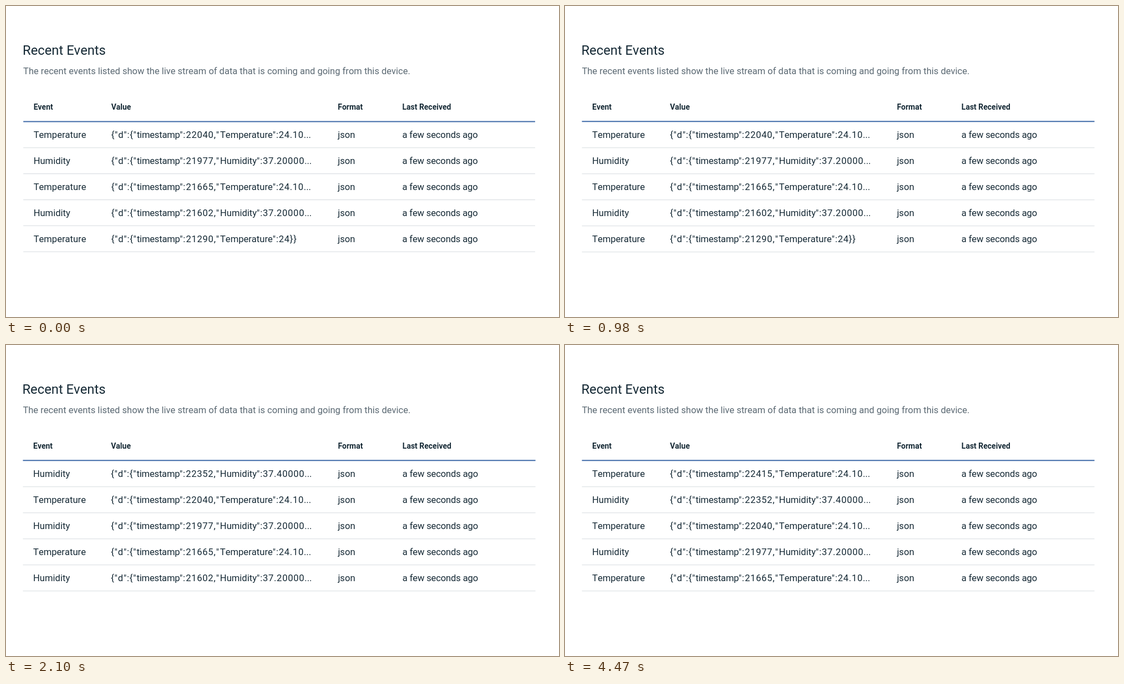
These frames come from a looping animation (997x561 px, 5670 ms). An HTML page:

```html
<!DOCTYPE html>
<html lang="en">
<head>
<meta charset="utf-8">
<title>Recent Events</title>
<style>
  html, body { margin: 0; width: 100%; height: 100%; overflow: hidden; background: #fff; }
  svg { display: block; width: 100vw; height: 100vh; }
  text { font: 16.6px Roboto, "Noto Sans", sans-serif; font-kerning: none; fill: #152935; }
  .title { font-size: 23.8px; }
  .intro { font-size: 16.54px; fill: #5a6872; }
  .head { font-size: 14px; font-weight: 700; }
  .ago { letter-spacing: -.15px; }
  .word { letter-spacing: -.2px; }
  .mark { letter-spacing: .8px; }
  .digits { letter-spacing: .7px; }
</style>
</head>
<body>
<svg viewBox="0 0 997 561"><g id="panel"></g></svg>
<script>
const LOOP = 5670;
const SETTLE = 980;
const ARRIVALS = [2100, 2660];
const ROWS = 5, PITCH = 47;
const LEFT = 30.5, RIGHT = 954.6;
const COLUMNS = { Event: 49, Value: 189.2, Format: 598.4, "Last Received": 714.8 };

// Oldest first: timestamp, sensor, visible end of the payload
const events = [
  [21290, "Temperature", "24", "}}"],
  [21602, "Humidity", "37.20000", "..."],
  [21665, "Temperature", "24.10", "..."],
  [21977, "Humidity", "37.20000", "..."],
  [22040, "Temperature", "24.10", "..."],
  [22352, "Humidity", "37.40000", "..."],
  [22415, "Temperature", "24.10", "..."]
];

const panel = document.getElementById("panel");

function add(parent, tag, attrs, content = "") {
  const node = document.createElementNS("http://www.w3.org/2000/svg", tag);
  for (const key in attrs) node.setAttribute(key, attrs[key]);
  node.textContent = content;
  return parent.appendChild(node);
}

const label = (x, y, content, cls = "") => add(panel, "text", { x, y, class: cls }, content);
const rule = (y, color, width) => add(panel, "line",
  { x1: LEFT, x2: RIGHT, y1: y, y2: y, stroke: color, "stroke-width": width });

label(29.4, 88.2, "Recent Events", "title");
label(30.4, 123, "The recent events listed show the live stream of data that is coming and going from this device.", "intro");
for (const name in COLUMNS) label(COLUMNS[name], 186.8, name, "head");
rule(208.3, "#406ba8", 2);

const rows = Array.from({ length: ROWS }, (_, i) => {
  const y = 238 + i * PITCH;
  rule(255.6 + i * PITCH, "#dfe3e6", 1.4);
  label(COLUMNS.Format, y, "json");
  label(COLUMNS["Last Received"], y, "a few seconds ago", "ago");
  return { name: label(COLUMNS.Event, y, ""), value: label(COLUMNS.Value, y, "") };
});

function writeValue(node, [stamp, sensor, reading, tail]) {
  node.textContent = "";
  const part = (cls, content, x) => add(node, "tspan", x ? { class: cls, x } : { class: cls }, content);
  part("mark", '{"d":{"');
  part("word", "timestamp", 235.5);
  part("mark", '":', 313);
  part("digits", stamp, 324.2);
  part("mark", ',"', 374.6);
  part("", sensor, 385.8);
  part("mark", '":');
  part("digits", reading);
  part(tail === "}}" ? "mark" : "", tail);
}

let shownNewest = -1;

function render(t) {
  // The view is very slightly smaller before it settles
  panel.setAttribute("transform",
    t < SETTLE ? "translate(500 270) scale(.9985) translate(-500 -270)" : "");

  const newest = ROWS - 1 + ARRIVALS.filter(time => t >= time).length;
  if (newest === shownNewest) return;
  shownNewest = newest;
  rows.forEach((row, i) => {
    const event = events[newest - i];
    row.name.textContent = event[1];
    writeValue(row.value, event);
  });
}

const start = performance.now();
function tick() {
  render((performance.now() - start) % LOOP);
  requestAnimationFrame(tick);
}
tick();
</script>
</body>
</html>
```
